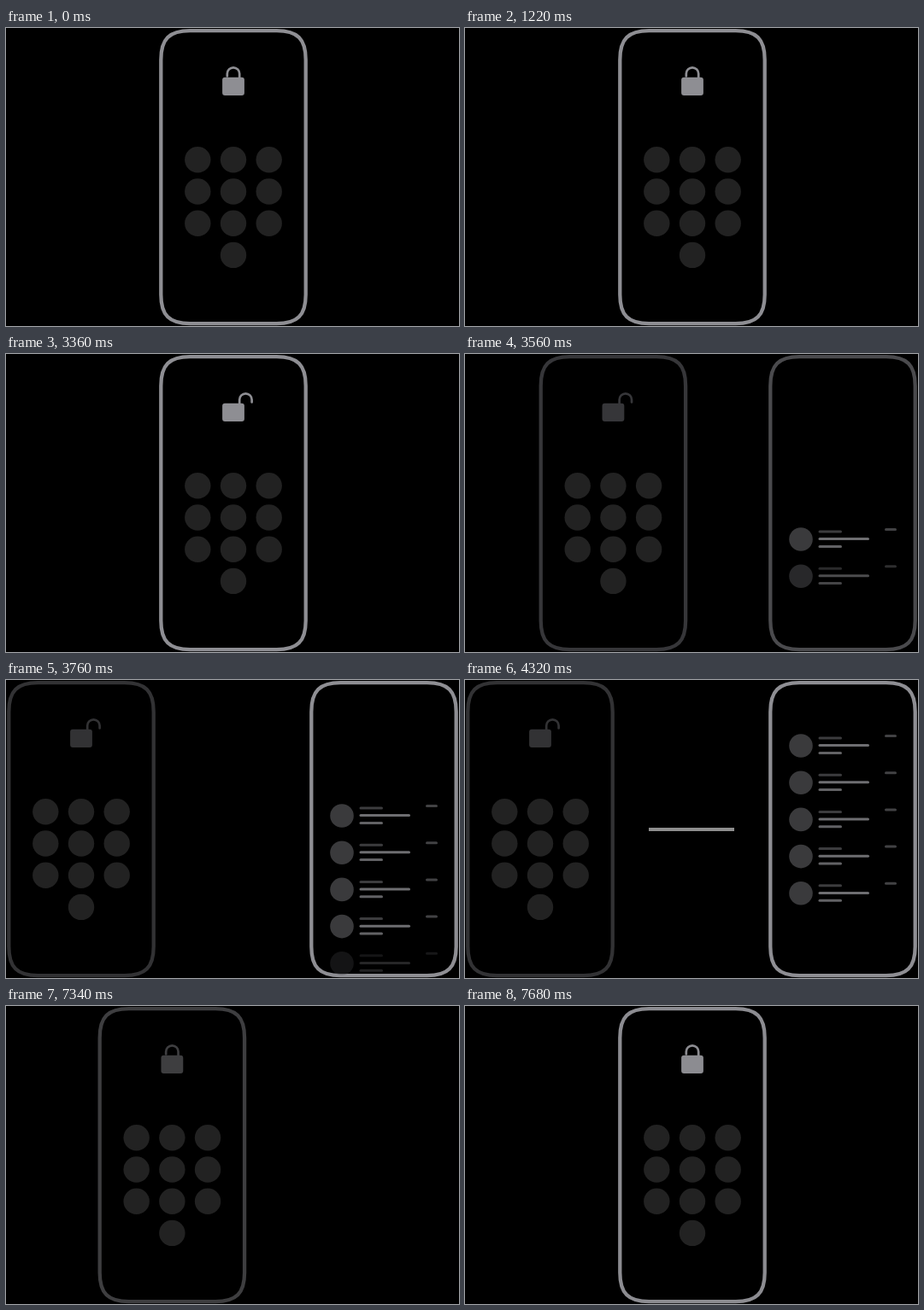
Write an HTML page with a canvas that moves like this. It is 530 by 349 pixels and loops after 8000 ms.

```html
<!DOCTYPE html>
<html lang="en">
<head>
<meta charset="utf-8">
<title>Unlock</title>
<style>
  html, body { margin: 0; width: 100%; height: 100%; overflow: hidden; background: #000; }
  canvas { display: block; width: 530px; height: 349px; }
</style>
</head>
<body>
<canvas id="stage" width="530" height="349"></canvas>
<script>
const ctx = document.getElementById('stage').getContext('2d');
const LOOP = 8000;
const BRIGHT = [142, 142, 147];
const DIM = [50, 50, 52];
const KEY = [34, 34, 34];
const KEY_LIT = [59, 59, 61];

const ramp = (t, from, to) => Math.min(1, Math.max(0, (t - from) / (to - from)));
const smooth = p => (1 - Math.cos(Math.PI * p)) / 2;
const mix = (a, b, p) => `rgb(${a.map((v, i) => Math.round(v + (b[i] - v) * p)).join(',')})`;

// Fades in and out over one press, with a short plateau
const pulse = (t, from, to) => Math.min(1, 1.5 * Math.sin(Math.PI * ramp(t, from, to)));

function disc(x, y, r, color) {
  ctx.fillStyle = color;
  ctx.beginPath();
  ctx.arc(x, y, r, 0, Math.PI * 2);
  ctx.fill();
}

function bar(x1, x2, y, color) {
  ctx.strokeStyle = color;
  ctx.lineWidth = 3;
  ctx.lineCap = 'round';
  ctx.beginPath();
  ctx.moveTo(x1 + 1.5, y);
  ctx.lineTo(x2 - 1.5, y);
  ctx.stroke();
}

function phoneFrame(cx, color) {
  const l = cx - 84.7, r = cx + 84.7, top = 3.2, bottom = 346.2;
  const e = 34, c = 9.7;
  ctx.beginPath();
  ctx.moveTo(l + e, top);
  ctx.lineTo(r - e, top);
  ctx.bezierCurveTo(r - c, top, r, top + c, r, top + e);
  ctx.lineTo(r, bottom - e);
  ctx.bezierCurveTo(r, bottom - c, r - c, bottom, r - e, bottom);
  ctx.lineTo(l + e, bottom);
  ctx.bezierCurveTo(l + c, bottom, l, bottom - c, l, bottom - e);
  ctx.lineTo(l, top + e);
  ctx.bezierCurveTo(l, top + c, l + c, top, l + e, top);
  ctx.closePath();
  ctx.fillStyle = '#000';
  ctx.fill();
  ctx.strokeStyle = color;
  ctx.lineWidth = 4.3;
  ctx.stroke();
}

function lock(cx, open, color) {
  const hinge = 7.2;
  ctx.save();
  ctx.translate(cx + hinge, 0);
  ctx.scale(1 - 2 * open || 0.01, 1);
  ctx.beginPath();
  ctx.moveTo(0, 60);
  ctx.lineTo(0, 53.5);
  ctx.arc(-hinge, 53.5, hinge, 0, Math.PI, true);
  ctx.lineTo(-2 * hinge, 56.5);
  ctx.strokeStyle = color;
  ctx.lineWidth = 2.7;
  ctx.lineCap = 'round';
  ctx.stroke();
  ctx.restore();
  ctx.fillStyle = color;
  ctx.beginPath();
  ctx.roundRect(cx - 12.9, 57.7, 25.8, 21.3, 3);
  ctx.fill();
}

function keypad(cx, t) {
  const presses = { 0: [1220, 1360], 4: [1700, 2080], 6: [2360, 2520] };
  for (let i = 0; i < 10; i++) {
    const col = i === 9 ? 1 : i % 3;
    const lit = presses[i] ? pulse(t, ...presses[i]) : 0;
    disc(cx + (col - 1) * 41.7, 154.3 + Math.floor(i / 3) * 37.2, 15.2, mix(KEY, KEY_LIT, lit));
  }
}

function listRow(y, alpha) {
  ctx.globalAlpha = alpha;
  disc(393, y, 13.8, '#3a3a3c');
  bar(413.5, 441, y - 9, '#3c3c3e');
  bar(413.5, 473, y - 0.4, '#6e6e71');
  bar(413.5, 441, y + 8.4, '#626265');
  bar(491, 505, y - 11.5, '#424244');
}

function listPhone(t) {
  const leaving = t < 6860 ? 1 : 0.87 * (1 - ramp(t, 6920, 7120));
  const shown = ramp(t, 3360, 3740) * leaving;
  if (!shown) return;
  ctx.save();
  ctx.globalAlpha = shown;
  phoneFrame(442, mix(BRIGHT, BRIGHT, 0));
  const offset = 164 * (1 - smooth(ramp(t, 3360, 4160)));
  for (let i = 0; i < 5; i++) {
    const start = 3400 + i * 80;
    listRow(77 + i * 43.2 + offset, ramp(t, start, start + 115) * leaving);
  }
  ctx.restore();
}

function lockPhone(t) {
  const away = smooth(ramp(t, 3360, 3750)) - smooth(ramp(t, 7115, 7515));
  const dim = ramp(t, 3360, 3570) - ramp(t, 7290, 7690);
  const open = smooth(ramp(t, 2480, 2600)) - smooth(ramp(t, 7120, 7240));
  const cx = 266 - 178 * away;
  const color = mix(BRIGHT, DIM, dim);
  phoneFrame(cx, color);
  lock(cx, open, color);
  keypad(cx, t);
}

function draw(now) {
  const t = Math.min(now % LOOP, 7680);
  ctx.fillStyle = '#000';
  ctx.fillRect(0, 0, 530, 349);
  listPhone(t);
  lockPhone(t);
  if (t >= 4320 && t < 6920) {
    ctx.fillStyle = '#8e8e8e';
    ctx.fillRect(215, 173, 100, 4);
  }
}

let began;
function tick(now) {
  began ??= now;
  draw(now - began);
  requestAnimationFrame(tick);
}
requestAnimationFrame(tick);
</script>
</body>
</html>
```
